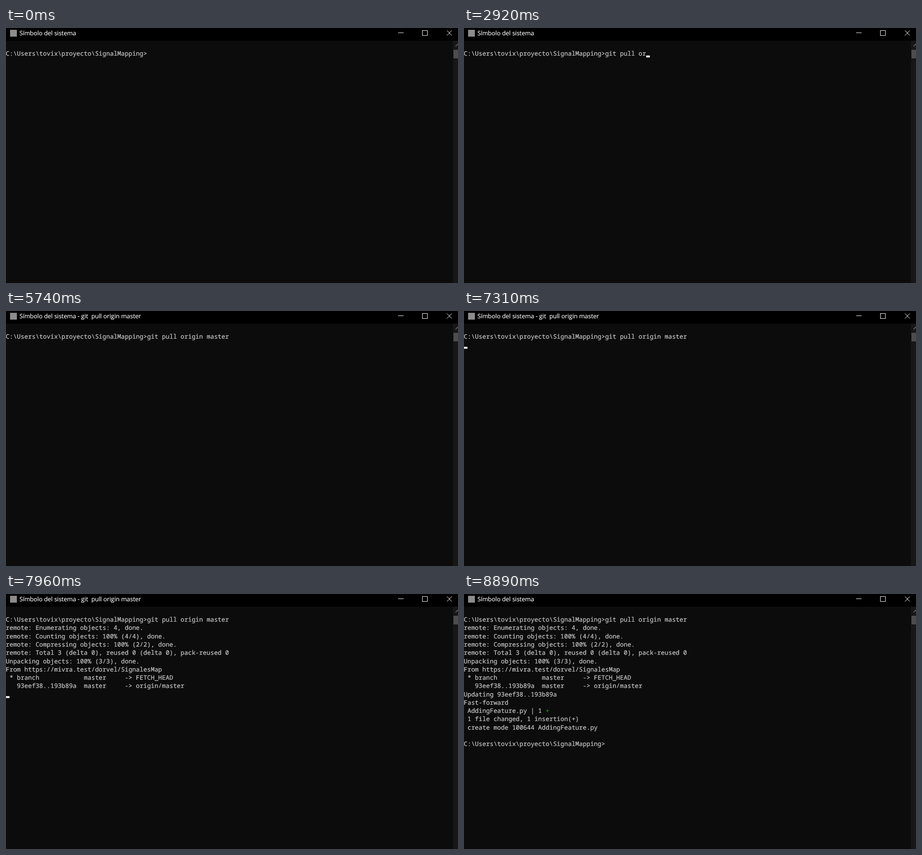
These frames come from a looping animation (997 px wide and 562 px high, 8.97 s). An HTML page:

```html
<!DOCTYPE html>
<html lang="es">
<head>
<meta charset="utf-8">
<style>
  html, body { margin: 0; width: 100%; height: 100%; overflow: hidden; background: #0c0c0c; }
  svg { display: block; width: 997px; height: 562px; }
  text { white-space: pre; text-rendering: geometricPrecision; font-variant-ligatures: none; }
  #title { font: 13.35px "Open Sans", "Noto Sans", sans-serif; fill: #fff; stroke: #fff; stroke-width: 0.15px; }
  #rows { font: 13.68px "Noto Sans Mono", "DejaVu Sans Mono", monospace; fill: #ccc; }
  #rows text { stroke: #ccc; stroke-width: 0.2px; }
  #rows tspan { fill: #13a10e; stroke: #13a10e; }
</style>
</head>
<body>
<svg viewBox="0 0 997 562">
  <rect width="997" height="562" fill="#0c0c0c"/>
  <rect width="997" height="28" fill="#000"/>
  <rect x="9" y="4" width="15" height="15" fill="#8c8c8c"/>
  <text id="title" x="29.7" y="16.4"></text>
  <g fill="none" stroke="#fff">
    <path d="M865 10.5H877"/>
    <rect x="918.5" y="5.5" width="11" height="11"/>
    <path d="M972.5 5.5L983.5 16.5M983.5 5.5L972.5 16.5"/>
  </g>
  <rect x="986" y="28" width="11" height="534" fill="#171717"/>
  <rect x="987" y="48" width="10" height="19" fill="#4d4d4d"/>
  <path d="M991.5 40.5L996 36L1000.5 40.5" fill="none" stroke="#686868" stroke-width="1.6"/>
  <g id="rows"></g>
  <rect id="cursor" width="8.2" height="4.3" fill="#f2f2f2"/>
</svg>
<script>
const LOOP = 8970, CELL = 8.21, LEFT = -0.5, PITCH = 18.27;
const COMMAND = "git pull origin master";
const PROMPT = String.raw`C:\Users\tovix\proyecto\SignalMapping>`;
const TITLE = "Símbolo del sistema";
const ENTER = 4320, FINISH = 8180;

const keyTimes = [
  160, 320, 410, 570, 660, 910, 1160, 1310, 2070, 2700, 2850,
  2930, 3010, 3100, 3180, 3350, 3430, 3510, 3670, 3740, 3910, 4050
];
const offTimes = [0, 990, 1480, 2540, 3590, 4160, 4710, 5740, 6750, 7880, 8890];
const onTimes = [...keyTimes, ENTER, 5190, 6270, 7310, 7710, 7960, 8010, 8090, FINISH];

// Each block of output appears at once.
const blocks = [
  [7710,
    "remote: Enumerating objects: 4, done.",
    "remote: Counting objects: 100% (4/4), done.",
    "remote: Compressing objects: 100% (2/2), done.",
    "remote: Total 3 (delta 0), reused 0 (delta 0), pack-reused 0"],
  [7800, "Unpacking objects: 100% (3/3), done."],
  [7960,
    "From https://mivra.test/dorvel/SignalesMap",
    " * branch            master     -> FETCH_HEAD",
    "   93eef38..193b89a  master     -> origin/master"],
  [8010, "Updating 93eef38..193b89a"],
  [8090,
    "Fast-forward",
    " AddingFeature.py | 1 +",
    " 1 file changed, 1 insertion(+)",
    " create mode 100644 AddingFeature.py"],
  [FINISH, "", PROMPT]
];

const byId = id => document.getElementById(id);
const title = byId("title"), cursor = byId("cursor"), rowGroup = byId("rows");

function add(parent, tag, attrs, content = "") {
  const node = document.createElementNS("http://www.w3.org/2000/svg", tag);
  for (const key in attrs) node.setAttribute(key, attrs[key]);
  node.textContent = content;
  return parent.appendChild(node);
}

const addRow = (row, content) =>
  add(rowGroup, "text", { x: LEFT, y: 61.2 + row * PITCH }, content);

const input = addRow(0, PROMPT);
const output = [];
for (const [time, ...lines] of blocks) {
  for (const line of lines) {
    const green = line.endsWith(" +");
    const node = addRow(output.length + 1, green ? line.slice(0, -1) : line);
    if (green) add(node, "tspan", {}, "+");
    output.push({ time, node });
  }
}

const count = (times, t) => times.filter(time => time <= t).length;
const latest = (times, t) => Math.max(-1, ...times.filter(time => time <= t));
const show = (node, visible) => node.setAttribute("visibility", visible ? "visible" : "hidden");

function draw(t) {
  const typed = count(keyTimes, t);
  const running = t >= ENTER && t < FINISH;
  input.textContent = PROMPT + COMMAND.slice(0, typed);
  title.textContent = TITLE + (running ? " - git  pull origin master" : "");

  let shown = 0;
  for (const { time, node } of output) {
    show(node, t >= time);
    if (t >= time) shown++;
  }

  let row = 0, col = PROMPT.length + typed;
  if (running) {
    row = shown + 1;
    col = 0;
  } else if (t >= FINISH) {
    row = shown;
    col = PROMPT.length;
  }
  cursor.setAttribute("x", LEFT + col * CELL);
  cursor.setAttribute("y", 60.6 + row * PITCH);
  show(cursor, latest(onTimes, t) > latest(offTimes, t));
}

const start = performance.now();
function tick() {
  draw((performance.now() - start) % LOOP);
  requestAnimationFrame(tick);
}
tick();
</script>
</body>
</html>
```
